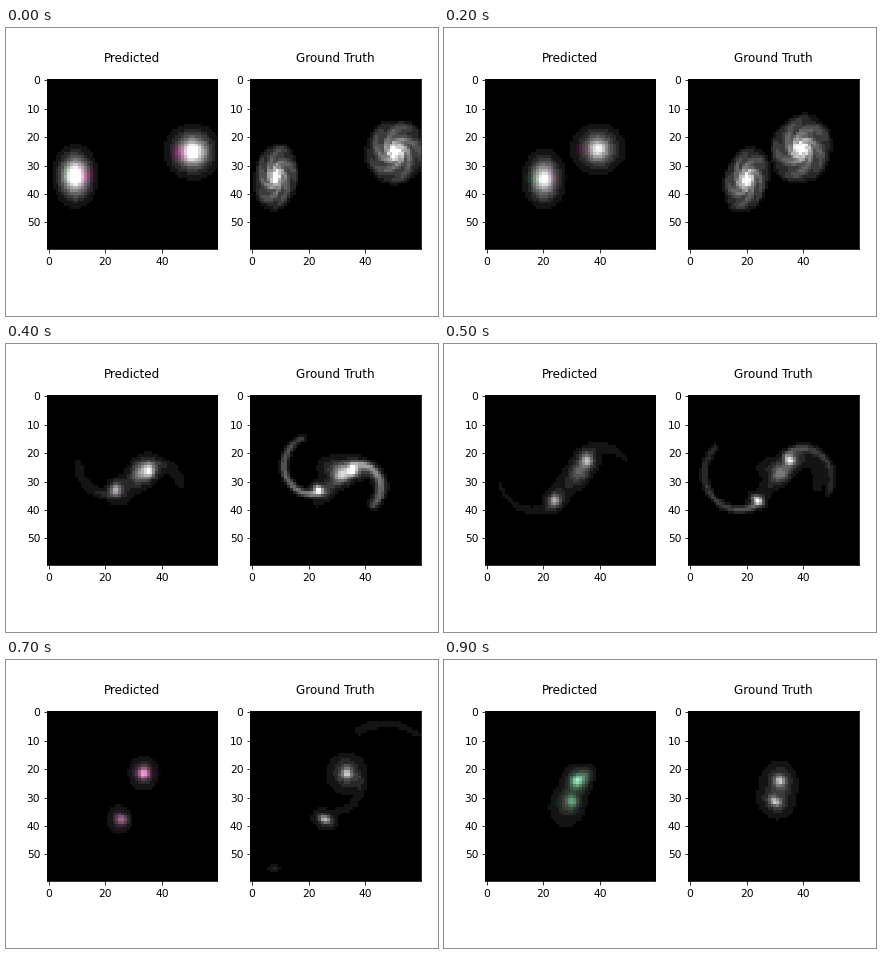
A matplotlib script for the animation above (1000 ms loop, 432 px wide and 288 px high).

```python
import numpy as np
import matplotlib.pyplot as plt
from matplotlib.animation import FuncAnimation

W, H, DPI = 432, 288, 72
N, FRAMES, INTERVAL = 60, 10, 100
STEP = 20 / 255          # brightness step of the posterised picture
CENTRE = np.array([29.6, 29.8])
PINK = np.array([0.12, -0.14, 0.03])
GREEN = np.array([-0.15, 0.08, -0.06])
Y, X = np.mgrid[0:N, 0:N].astype(float)


def nuclei(k):
    """Both cores lie opposite each other: straight approach, then an orbit."""
    if k < 3:
        half = np.array([-21 + 5.7 * k, 4.4 + 0.5 * k])
    else:
        t = k - 3
        angle = np.radians(-41 - 6 * t + 140 * np.exp(-2 * t))
        radius = 3.7 + 6.1 * np.sin(np.pi * t / 6)
        half = radius * np.array([np.cos(angle), np.sin(angle)])
    middle = CENTRE + np.array([0.7, -0.9]) * max(k - 7, 0)
    return middle + half, middle - half


def local(centre, rx, ry, tilt):
    """Coordinates in a tilted ellipse; radius 1 is its rim."""
    a = np.radians(tilt)
    dx, dy = X - centre[0], Y - centre[1]
    return ((dx * np.cos(a) + dy * np.sin(a)) / rx,
            (dy * np.cos(a) - dx * np.sin(a)) / ry)


def blob(centre, rx, ry, amp=1.0, tilt=0):
    u, v = local(centre, rx, ry, tilt)
    return amp * np.exp(-(u * u + v * v))


def spiral(centre, rx, ry, tilt, turn):
    u, v = local(centre, rx, ry, tilt)
    r = np.hypot(u, v) + 1e-3
    arms = 0.5 + 0.5 * np.cos(5 * (np.arctan2(v, u) - 1.7 * np.log(r) + turn))
    rim = 1 / (1 + np.exp((r - 0.95) / 0.05))
    disk = (0.42 + 0.34 * arms) * np.exp(-1.15 * r) * rim
    return disk + 0.6 * np.exp(-(r / 0.28) ** 2)


def tail(centre, radii, angles, width, amp, grow=1, turn=0):
    """Spiral arc that fades outwards, scaled and turned about the middle."""
    s = np.linspace(0, 1, 150)
    a = np.radians(angles[0] + (angles[1] - angles[0]) * s)
    r = radii[0] + (radii[1] - radii[0]) * s
    x, y = centre[0] + r * np.cos(a) - CENTRE[0], centre[1] + r * np.sin(a) - CENTRE[1]
    c, d = grow * np.cos(np.radians(turn)), grow * np.sin(np.radians(turn))
    x, y = CENTRE[0] + c * x - d * y, CENTRE[1] + d * x + c * y
    d2 = (X[..., None] - x) ** 2 + (Y[..., None] - y) ** 2
    return (amp * (1 - 0.55 * s) * np.exp(-d2 / width ** 2)).max(axis=2)


def tails(k, width, amp, reach=1):
    """Tidal tails; reach is the part of their length that is visible."""
    pose = dict(grow=1 + 0.2 * (k - 5), turn=-22 * (k - 5))
    return (tail((39, 28), (8.5, 11.5), (235, 235 + 155 * reach), width, amp, **pose)
            + tail((18.3, 28.5), (11, 13.8), (58, 58 + 170 * reach),
                   width * 0.85, amp, **pose))


def truth(k):
    a, b = nuclei(k)
    if k < 3:
        return (spiral(a, 7.8, 11.8, 8 + 4 * k, -0.3 * k)
                + spiral(b, 10.7, 11.5 + 0.4 * k, 20, -0.3 * k))
    if k == 3:
        return (blob(CENTRE, 4.4, 12, 0.4, 10) + blob((33, 23), 6, 9, 0.18, 15)
                + blob(a, 2.4, 4.2, 0.45, 5) + blob(b, 2.8, 4.2, 0.45, 15)
                + tail((33, 22), (6, 9), (170, 360), 1.2, 0.25)
                + tail((27, 39), (5, 6.5), (0, 200), 1.2, 0.25))
    if k < 7:
        fade = 0.32 * 0.6 ** (k - 5)
        return (tails(k, 1.4, fade)
                + tail((38, 28), (5, 8), (250, 390), 2.4, fade * 0.4,
                       turn=-22 * (k - 5))
                + blob((32.3, 27.8), 3, 2.6, fade, -40)
                + blob((29.5, 25.5), 5, 3.5, fade * 0.45)
                + blob(CENTRE, 9, 2.6, fade * 0.4, -50)
                + blob(a, 1.7, 1.5, 0.72) + blob(b, 2.1, 1.3, 0.72, 35)
                + blob(a, 3.6, 3.6, 0.12) + blob(b, 3.2, 2.6, 0.12))
    late = (k - 7) / 2
    return (blob(a, 1.4, 1.6, 0.5) + blob(a, 3.6, 4, 0.26)
            + blob(b, 2, 1.2, 0.5, 25) + blob(b, 3.8, 3, 0.22, 20)
            + blob((a + b) / 2, 6.5, 9.5, 0.11 * late)
            + blob(a, 7, 7, 0.1 * (1 - late))
            + tail((30, 26), (8, 9), (-20, 90), 1.6, 0.1 * (1 - late))
            + tail((48, 24), (20, 19), (240, 305), 1.5, 0.1 * (1 - late))
            + blob((8, 55), 2.2, 1.5, 0.12 * (1 - late)))


def predicted(k):
    a, b = nuclei(k)
    if k < 3:
        glow = 1.1 - 0.15 * k
        a = a + (0.8 - 0.3 * k, -0.3)
        grey = (blob(a, 4.5, 6.2, glow) + blob(a, 2.2, 2.6, 0.3)
                + blob(b, 5.8, 5.6, glow - 0.2) + blob(b, 2.4, 2.8, 0.4))
        tints = [(a + (5, 0), 2.8, PINK, 2 - 0.6 * k), (a - (4, 0), 3, GREEN, 0.6),
                 (b - (6, -0.5), 2.8, PINK, 2.5 - 0.6 * k)]
    elif k == 3:
        grey = (blob(a + (-0.5, -0.2), 4, 6, 0.85) + blob(b + (1, -0.5), 4.6, 6.2, 0.8, -10)
                + blob((38, 22.5), 8, 5.5, 0.11, 20) + blob((24, 37), 7, 6, 0.1))
        tints = [(b - (3, 0), 3, GREEN, 0.6), (b + (5, 1), 2.5, PINK, 0.8)]
    elif k < 7:
        fade = 0.26 * 0.6 ** (k - 5)
        grey = (tails(k, 1.9, fade * 0.35, 0.65)
                + blob((32.8, 27), 3, 3.6, fade, 25)
                + blob(CENTRE, 10, 4, 0.12, -52)
                + blob(a, 1.9, 2, 0.52) + blob(b, 1.9, 2, 0.46)
                + blob(a, 3.6, 3.6, 0.18) + blob(b, 3.2, 3.2, 0.14))
        tints = [(b, 2, PINK, 0.3)]
    else:
        late = (k - 7) / 2
        grey = (blob(a, 1.7, 1.8, 0.58 - 0.12 * late) + blob(a, 4, 4.4, 0.28)
                + blob(a + (2.5, -1.8), 3.2, 2.4, 0.25 * late, -35)
                + blob(b, 1.9, 1.6, 0.38 - 0.06 * late, 25)
                + blob(b - (1, 0), 3.6, 4, 0.2) + blob((28, 34), 6, 6.5, 0.1 * late))
        colour = PINK * (1 - late) + GREEN * late
        tints = [(a, 5, colour, 1.8), (b, 4, colour, 1.6)]
    rgb = np.repeat(grey[..., None], 3, axis=2)
    for centre, size, colour, amount in tints:
        rgb *= 1 + blob(centre, size, size, amount)[..., None] * colour
    return rgb


def posterise(image):
    if image.ndim == 2:
        image = np.repeat(image[..., None], 3, axis=2)
    return np.clip(np.round(image / STEP) * STEP, 0, 1)


def panel(left, title):
    side = 170.15
    ax = fig.add_axes([left / W, 66.8 / H, side / W, side / H])
    ax.set_title(title, fontsize=12, pad=17)
    picture = ax.imshow(np.zeros((N, N, 3)), interpolation="nearest", aspect="auto")
    ax.set_xticks(range(0, N, 20))
    ax.set_yticks(range(0, N, 10))
    ax.tick_params(labelsize=10.6)
    ax.tick_params(axis="x", pad=4.5)
    return picture


plt.rcParams["font.family"] = "DejaVu Sans"
fig = plt.figure(figsize=(W / DPI, H / DPI), dpi=DPI, facecolor="white")
panels = [(panel(41.2, "Predicted"), predicted),
          (panel(244.45, "Ground Truth"), truth)]


def update(k):
    for picture, render in panels:
        picture.set_data(posterise(render(k)))
    return [picture for picture, _ in panels]


anim = FuncAnimation(fig, update, frames=FRAMES, interval=INTERVAL,
                     repeat=True, repeat_delay=0, blit=False)
plt.show()
```
